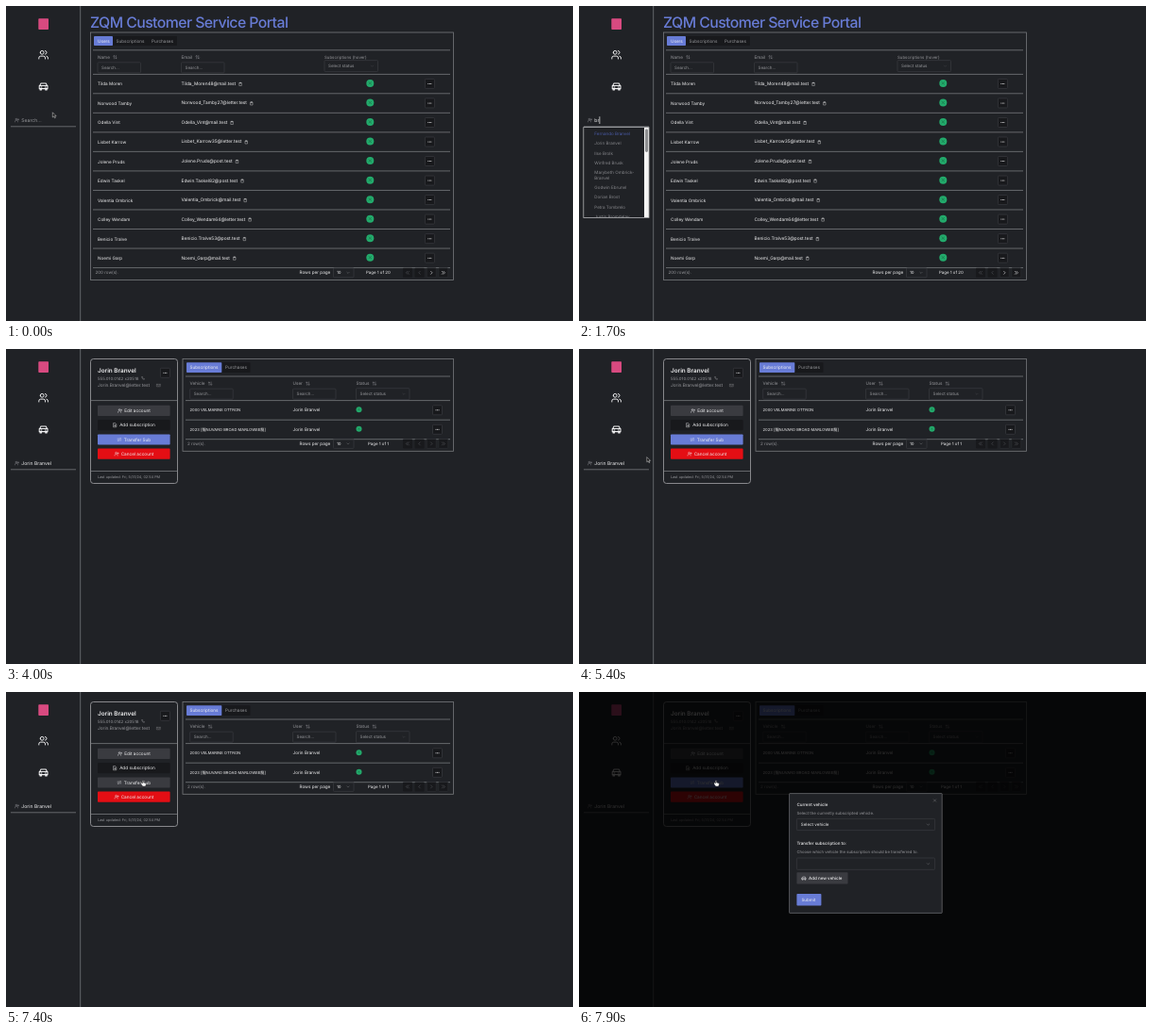
An HTML page for the animation above (8 s loop, 600 by 334 pixels).

```html
<!DOCTYPE html>
<html lang="en">
<head>
<meta charset="utf-8">
<title>Customer Service Portal</title>
<style>
  html, body { margin: 0; width: 100%; height: 100%; overflow: hidden; background: #202226; }
  svg { display: block; width: 100vw; height: 100vh; }
  text { font-family: Inter, "Noto Sans CJK JP", "Noto Sans CJK SC", sans-serif; text-rendering: geometricPrecision; white-space: pre; }
</style>
</head>
<body>
<svg id="stage" viewBox="0 0 600 334" xmlns="http://www.w3.org/2000/svg"></svg>
<script>
const LOOP = 8000, STEP = 100;
const BG = '#202226', WHITE = '#f1f1f2', GREY = '#96979b', DIM = '#55575c', LINE = '#77797d',
      FAINT = '#36383d', BLUE = '#687cd6', DARK = '#18191c', BUTTON = '#3a3b40', GREEN = '#23ab6c';

// Icons on a 24-unit grid
const ICONS = {
  users: 'M16 21v-2a4 4 0 0 0-4-4H6a4 4 0 0 0-4 4v2M5 7a4 4 0 1 0 8 0a4 4 0 1 0-8 0M22 21v-2a4 4 0 0 0-3-3.9M16 3.1a4 4 0 0 1 0 7.8',
  user: 'M3 21v-2a5 5 0 0 1 5-5h5a5 5 0 0 1 5 5v2M6.500 7a4 4 0 1 0 8 0a4 4 0 1 0-8 0M17 9h6M20 6v6',
  car: 'M3 11l3-6h12l3 6M2 11h20v7H2zM4 18v3h3v-3M17 18v3h3v-3M6 14.500h2M16 14.500h2',
  sort: 'M7 20V4L3 8M7 4l4 4M17 4v16l4-4M17 20l-4-4',
  copy: 'M6 5h12v16H6zM9 3h6v4H9z',
  down: 'M5 9l7 7 7-7',
  prev: 'M15 5l-7 7 7 7',
  next: 'M9 5l7 7-7 7',
  first: 'M11 5l-7 7 7 7M19 5l-7 7 7 7',
  last: 'M5 5l7 7-7 7M13 5l7 7-7 7',
  phone: 'M5 3h4l2 5-3 2a12 12 0 0 0 6 6l2-3 5 2v4c-9 3-19-7-16-16',
  mail: 'M2 5h20v14H2zM2 6l10 8 10-8',
  file: 'M5 2h9l5 5v15H5zM12 10v8M8 14h8',
  swap: 'M3 8h18l-4-4M21 16H3l4 4',
  close: 'M5 5l14 14M19 5L5 19',
  check: 'M6 5l5 7 7 5M6 16l6-4 5-6'
};

const pen = document.createElement('canvas').getContext('2d');
function textWidth(str, size) {
  pen.font = '100px Inter, sans-serif';
  return pen.measureText(str).width * size / 100;
}

// x is the left edge, y the vertical middle
const text = (x, y, str, fill = WHITE, size = 4.65, extra = '') =>
  `<text x="${x}" y="${y + size * 0.35}" font-size="${size}" fill="${fill}" ${extra}>${str}</text>`;
const box = (x1, y1, x2, y2, fill = 'none', stroke = 'none', rx = 0.8) =>
  `<rect x="${x1}" y="${y1}" width="${x2 - x1}" height="${y2 - y1}" rx="${rx}" fill="${fill}" stroke="${stroke}" stroke-width=".8"/>`;
const rule = (x1, x2, y) => `<path d="M${x1} ${y}H${x2}" stroke="${LINE}" stroke-width=".8"/>`;
const icon = (name, cx, cy, size, color = WHITE, weight = 2) =>
  `<path d="${ICONS[name]}" transform="translate(${cx - size / 2} ${cy - size / 2}) scale(${size / 24})" fill="none" stroke="${color}" stroke-width="${weight}" stroke-linecap="round" stroke-linejoin="round"/>`;
const dots = (cx, cy) => box(cx - 5, cy - 5, cx + 5, cy + 5, DARK, FAINT) +
  [-1.5, 0, 1.5].map(d => `<circle cx="${cx + d}" cy="${cy}" r=".5" fill="${WHITE}"/>`).join('');
const status = (cx, cy, r) => `<circle cx="${cx}" cy="${cy}" r="${r}" fill="${GREEN}"/>` +
  icon('check', cx, cy, r * 1.4, '#14663f');
const header = (x, y, label) => text(x, y, label, GREY) + icon('sort', x + textWidth(label, 4.65) + 5.5, y, 5, GREY);
const input = (x, y) => box(x, y - 5.5, x + 45.5, y + 5.5, 'none', FAINT) + text(x + 4, y, 'Search...', GREY, 4.5);
const select = (x, y) => box(x, y - 6, x + 56.5, y + 6, 'none', FAINT) +
  text(x + 4, y, 'Select status', GREY, 4.5) + icon('down', x + 50.5, y, 4, DIM);

function footer(y, count, pages, nextColor) {
  return text(count === 2 ? 192 : 94.5, y, `${count} row(s).`, GREY, 4.5) +
    text(310.5, y, 'Rows per page') + box(346.5, y - 5, 368, y + 5, 'none', FAINT) +
    text(350, y, '10', WHITE, 4.4) + icon('down', 362, y, 4, GREY) +
    text(381 + (count === 2 ? 2 : 0), y, `Page 1 of ${pages}`, WHITE, 4.4) +
    ['first', 'prev', 'next', 'last'].map((name, i) => {
      const x = 425 + i * 12.6;
      return box(x - 5, y - 5, x + 5, y + 5, DARK, i < 2 ? 'none' : '#2a2c30') + icon(name, x, y, 5.2, i < 2 ? DIM : nextColor, 2.5);
    }).join('');
}

const PEOPLE = [
  ['Tilda Moren', 'Tilda_Moren48@mail.test'],
  ['Norwood Tamby', 'Norwood_Tamby27@letter.test'],
  ['Odella Vint', 'Odella_Vint@mail.test'],
  ['Lisbet Karrow', 'Lisbet_Karrow35@letter.test'],
  ['Jolene Pruds', 'Jolene.Pruds@post.test'],
  ['Edwin Taskel', 'Edwin.Taskel82@post.test'],
  ['Valentia Ombrick', 'Valentia_Ombrick@mail.test'],
  ['Colley Wendam', 'Colley_Wendam64@letter.test'],
  ['Benicio Tralve', 'Benicio.Tralve53@post.test'],
  ['Noemi Garp', 'Noemi_Garp@mail.test']
];
const CUSTOMER = 'Jorin Branvel';

function sidebar() {
  return '<path d="M78.700 0V334" stroke="#6d6f73" stroke-width=".9"/>' +
    box(34.3, 13.3, 45, 25, '#d84a80') +
    icon('users', 39.6, 51.7, 11.5) + icon('car', 39.6, 85, 10.5, WHITE, 2.4) +
    icon('user', 11.3, 121, 5, GREY) + rule(5, 74, 127.8);
}

function homePage() {
  const rows = PEOPLE.map(([name, mail], i) => {
    const y = 82.4 + i * 20.53;
    return text(97, y + 0.4, name) + text(185.5, y - 0.2, mail, WHITE, 4.8) +
      icon('copy', 190.5 + textWidth(mail, 4.8), y + 0.4, 4.4) +
      status(385.3, y - 0.4, 4) + dots(448.4, y) + rule(92, 470, y + 10.4);
  }).join('');
  return text(89, 17.8, 'ZQM Customer Service Portal', BLUE, 15.8, 'font-weight="500" letter-spacing="-.55"') +
    box(89.4, 28, 473.5, 290.5, 'none', LINE, 0) +
    box(93, 32, 181, 42, DARK) + box(93, 32, 113, 42, BLUE) +
    text(97, 37, 'Users') + text(116.5, 37, 'Subscriptions', GREY) + text(154, 37, 'Purchases', GREY) +
    rule(92, 470, 46.8) + header(97, 54.2, 'Name') + header(185.5, 54.2, 'Email') +
    text(337, 54.2, 'Subscriptions (hover)', GREY, 4.4) +
    input(97, 65.3) + input(185.5, 65.3) + select(337, 63.6) +
    rule(92, 470, 72.4) + rows + footer(282.8, 200, 20, WHITE);
}

function cardButton(id, y, label, glyph, fill) {
  const left = 135.5 - textWidth(label, 4.7) / 2 + 3.5;
  return `<g id="${id}">${box(97, y - 5.6, 173.6, y + 5.6, fill)}</g>` +
    icon(glyph, left - 4.8, y, 5) + text(left, y, label, WHITE, 4.7);
}

function accountPage() {
  const phone = '555.010.0142 x20518', mail = 'Jorin.Branvel@letter.test';
  const cars = ['2000 VELMARINE OTTRON', '2023 [龍NUVARO BROAD MARLOWEE龍]'];
  return box(89.5, 10.5, 181.5, 142.5, BG, '#a2a3a6', 3) +
    text(97, 22.6, CUSTOMER, WHITE, 6.4, 'font-weight="600"') +
    text(97, 31, phone, GREY, 4.4) + icon('phone', 145, 31, 4.2, GREY) +
    text(97, 38.6, mail, GREY, 4.75) + icon('mail', 161.5, 38.6, 4.2, GREY) +
    dots(168.4, 25.3) + rule(90, 181, 54.6) +
    cardButton('edit', 65.4, 'Edit account', 'user', BUTTON) +
    cardButton('add', 80.7, 'Add subscription', 'file', DARK) +
    cardButton('transfer', 96, 'Transfer Sub', 'swap', BLUE) +
    cardButton('cancel', 111.2, 'Cancel account', 'user', '#e40e14') +
    rule(90, 181, 129.5) + text(97, 135.7, 'Last updated: Fri, 5/31/24, 02:54 PM', GREY, 3.85) +
    box(187, 10.5, 473.5, 108.3, 'none', LINE, 0) +
    box(191, 14.3, 258.5, 25, DARK) + box(191, 14.3, 228.3, 25, BLUE) +
    text(194.5, 19.6, 'Subscriptions', WHITE) + text(232, 19.6, 'Purchases', GREY) +
    rule(190, 470, 29) + header(194.5, 36.6, 'Vehicle') + header(303.5, 36.6, 'User') + header(370.5, 36.6, 'Status') +
    input(194.7, 47.7) + input(303.5, 47.7) + select(370.5, 47.7) + rule(190, 470, 54.6) +
    cars.map((car, i) => {
      const y = 64.8 + i * 20.5;
      return text(194.5, y, car, WHITE, 4.15) + text(303.5, y, CUSTOMER) +
        status(373.5, y - 0.6, 3) + dots(456.5, y) + rule(190, 470, y + 10.4);
    }).join('') + footer(100.4, 2, 1, DIM);
}

function dropdown(bottom, names, chosen, scrolls) {
  const items = names.map(([name, y], i) => text(16.3, y, name, chosen.includes(i) ? '#4a5ba8' : '#85868a', 4.55)).join('');
  return box(4.8, 128.6, 74, bottom, BG, '#b4b5b7', 0) + `<g clip-path="url(#list)">${items}</g>` +
    (scrolls ? box(69, 129, 73.8, bottom - 0.4, '#f4f4f4', 'none', 0) + box(70, 130.5, 73, 155, '#8c8d8f', 'none', 1.4) : '');
}
const LONG_LIST = [['Fernando Branvel', 135.6], [CUSTOMER, 145.8], ['Ilse Brolk', 156], ['Winfred Brusk', 166.2],
  ['Marybeth Ombrick-', 176.2], ['Branvel', 182.6], ['Godwin Ebrunel', 192.6], ['Dorian Brost', 202.8],
  ['Petra Tombrelo', 213], ['Justin Bromdelay', 223.2]];
const SHORT_LIST = [['Fernando Branvel', 135.6], [CUSTOMER, 145.8], ['Marybeth Ombrick-', 156], ['Branvel', 162.2], ['Henrietta Bruna', 172.4]];

function dialog() {
  const bold = 'font-weight="500"';
  return box(222.6, 107.6, 384.2, 234.4, BG, '#66676b', 0.5) + icon('close', 376.5, 115, 4.2, GREY) +
    text(230.4, 119, 'Current vehicle', WHITE, 4.5, bold) +
    text(230.4, 128.5, 'Select the currently subscripted vehicle.', GREY, 4.3) +
    box(230.4, 134.4, 376.6, 146.6, 'none', FAINT) + text(234.8, 140.5, 'Select vehicle', WHITE, 4.5) + icon('down', 369.5, 140.5, 4.2, GREY) +
    text(230.4, 160.5, 'Transfer subscription to:', WHITE, 4.5, bold) +
    text(230.4, 170, 'Choose which vehicle the subscription should be transferred to.', GREY, 4.25) +
    box(230.4, 176, 376.6, 188.3, 'none', FAINT) + icon('down', 369.5, 182.2, 4.2, GREY) +
    box(230.4, 191.3, 284.5, 203.5, BUTTON) + icon('car', 238, 197.4, 5) + text(243, 197.4, 'Add new vehicle', WHITE, 4.5, bold) +
    box(230.4, 214, 256.4, 226.5, BLUE) + text(235.4, 220.2, 'Submit', WHITE, 4.5);
}

const group = (id, content) => `<g id="${id}">${content}</g>`;
document.getElementById('stage').innerHTML =
  '<defs><clipPath id="list"><rect x="5" y="129" width="69" height="95"/></clipPath></defs>' +
  box(0, 0, 600, 334, BG, 'none', 0) + sidebar() +
  group('home', homePage()) + group('account', accountPage()) +
  '<text id="query" x="16.3" y="122.800" font-size="5.1"></text>' +
  box(0, 117.2, 0.7, 125, WHITE, 'none', 0).replace('<rect', '<rect id="caret"') +
  group('matches', dropdown(224.4, LONG_LIST, [0], true)) +
  group('narrowFirst', dropdown(178.8, SHORT_LIST, [0], false)) +
  group('narrowSecond', dropdown(178.8, SHORT_LIST, [1], false)) +
  '<rect id="shade" width="600" height="334"/>' + group('modal', dialog()) +
  group('arrow', '<path d="M0 0V5.200L1.300 4.100L2.200 6L3.100 5.600L2.200 3.800H3.800Z" fill="#111" stroke="#ddd" stroke-width=".5"/>') +
  group('hand', '<path d="M-.6 0Q0-.7.500 0V2L3 2.700Q3.500 3 3.200 4.200L2.600 6H-.3L-2 3.700Q-2-.0-.6 3Z" fill="#f5f5f5" stroke="#222" stroke-width=".4"/>');

const el = Object.fromEntries([...document.querySelectorAll('[id]')].map(node => [node.id, node]));
const show = (node, on) => node.setAttribute('display', on ? 'inline' : 'none');
const setFill = (node, fill) => node.firstChild.setAttribute('fill', fill);

// [time, x, y] of the pointer tip
const PATH = [[0, 49.3, 112.8], [100, 48, 115], [500, 46, 117], [900, 46, 117], [5100, 53, 113.5], [5300, 53, 113.5],
  [5400, 71.8, 114.6], [5700, 102, 150], [5900, 124, 168], [6200, 138, 136], [6400, 143, 111], [6700, 145, 97], [7000, 145, 94], [8000, 145, 94]];
function pointerAt(t) {
  const i = Math.max(1, PATH.findIndex(p => p[0] >= t));
  const [a, b] = [PATH[i - 1], PATH[i]], k = (t - a[0]) / (b[0] - a[0]);
  return [a[1] + (b[1] - a[1]) * k, a[2] + (b[2] - a[2]) * k];
}

const TYPED = [[900, 'b'], [1400, 'br'], [1900, 'bra'], [2100, 'bran'], [3800, CUSTOMER]];

function draw(now) {
  const t = Math.floor(now % LOOP / STEP) * STEP;
  const typed = TYPED.filter(([at]) => t >= at).map(([, word]) => word).pop() || '';
  el.query.textContent = typed || 'Search...';
  el.query.setAttribute('fill', typed ? WHITE : GREY);
  el.caret.setAttribute('x', 16.5 + textWidth(typed, 5.1));
  show(el.caret, t >= 500 && t < 3800 && !(t >= 2300 && t < 2700));

  show(el.home, t < 4000);
  show(el.account, t >= 4000);
  show(el.matches, t >= 900 && t < 2100);
  show(el.narrowFirst, t >= 2100 && t < 3000);
  show(el.narrowSecond, t >= 3000 && t < 3800);

  const [x, y] = pointerAt(t);
  const over = t >= 5400 && x > 97 && x < 173.6 && y > 90.4 && y < 116.8;
  const onTransfer = over && y < 101.6;
  setFill(el.transfer, onTransfer && t < 7800 ? BUTTON : BLUE);
  show(el.arrow, (t < 900 || t >= 5100) && !over);
  show(el.hand, over);
  for (const node of [el.arrow, el.hand]) node.setAttribute('transform', `translate(${x} ${y})`);

  const opening = t === 7800;
  show(el.shade, t >= 7800);
  show(el.modal, t >= 7800);
  el.shade.setAttribute('opacity', opening ? 0.55 : 0.8);
  el.modal.setAttribute('opacity', opening ? 0.75 : 1);
  el.modal.setAttribute('transform', opening ? 'translate(303.4 171.500) scale(.983) translate(-303.4 -171)' : '');
}

const start = performance.now();
function tick() {
  draw(performance.now() - start);
  requestAnimationFrame(tick);
}
tick();
</script>
</body>
</html>
```
